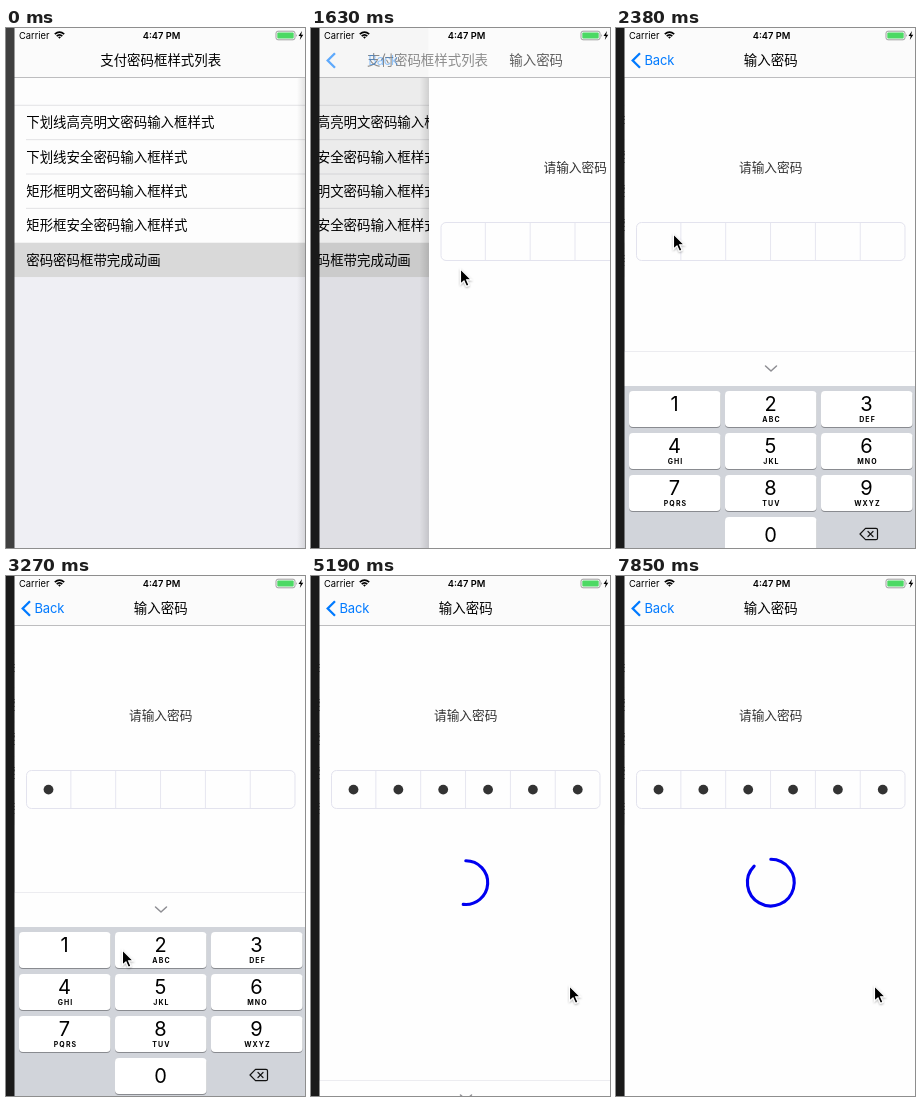
An HTML page for the animation above (8 s loop, 299 by 520 pixels).

```html
<!DOCTYPE html>
<html lang="zh-CN">
<head>
<meta charset="utf-8">
<title>Passcode entry</title>
<style>
  html, body { margin: 0; width: 100%; height: 100%; overflow: hidden; background: #fff; }
  svg { display: block; width: 100%; height: 100%; }
  text { font-family: Inter, Roboto, "Noto Sans CJK SC", "Noto Sans CJK", sans-serif; }
  .cjk { font-family: "Noto Sans CJK SC", "Noto Sans CJK", sans-serif; font-size: 13.45px; }
  .title { font-weight: 500; text-anchor: middle; }
  .status { font-size: 9.3px; }
  .digit { font-size: 20px; text-anchor: middle; }
  .letters { font-size: 7px; font-weight: 700; letter-spacing: 1.1px; text-anchor: middle; }
  .line { fill: none; stroke-linecap: round; stroke-linejoin: round; }
</style>
</head>
<body>
<svg viewBox="0 0 299 520">
  <defs>
    <linearGradient id="edge">
      <stop offset="0" stop-color="#000" stop-opacity="0"/>
      <stop offset="1" stop-color="#000" stop-opacity=".12"/>
    </linearGradient>
    <filter id="soft" x="-50%" y="-50%" width="200%" height="200%">
      <feDropShadow dx="0" dy="1" stdDeviation="1" flood-opacity=".35"/>
    </filter>
  </defs>

  <g id="list">
    <rect x="8" y="49" width="292" height="471" fill="#efeff4"/>
    <rect x="8" y="49" width="292" height="200" fill="#fdfdfd"/>
    <g id="rows"></g>
  </g>
  <rect id="dim" y="49" width="299" height="471"/>

  <g id="page">
    <rect x="-1" y="50" width="9.5" height="470" fill="url(#edge)"/>
    <rect x="8.5" y="49" width="292" height="471" fill="#fefefe"/>
    <text class="cjk" x="154.7" y="144.2" text-anchor="middle" style="font-size:12.7px" fill="#333">请输入密码</text>
    <rect x="20.5" y="194.5" width="268.5" height="38" rx="5" fill="none" stroke="#e3e3ee"/>
    <g id="cells"></g>
    <path id="ring" class="line" stroke="#0000f0" stroke-width="3.1"/>
  </g>

  <g id="keyboard">
    <rect x="8" y="316" width="292" height="36" fill="#fefefe"/>
    <path d="M8 316.5H299" stroke="#ececf0"/>
    <path d="M149.5 331 155 336 160.500 331" class="line" stroke="#8e8e93" stroke-width="1.5"/>
    <rect x="8" y="351" width="292" height="380" fill="#d1d4da"/>
    <g id="keys"></g>
    <g class="line" stroke="#111" stroke-width="1.2">
      <path d="M244 499 249.500 493.300H260Q261.500 493.300 261.500 494.800V503.200Q261.500 504.700 260 504.700H249.500Z"/>
      <path d="M252 496.500 257 501.500M257 496.500 252 501.500"/>
    </g>
  </g>

  <rect x="8" width="292" height="49.500" fill="#fbfbfb"/>
  <rect id="barShade" x="8" width="0" height="49" fill="#000" opacity=".018"/>
  <path d="M8 49.500H299" stroke="#bdbdbf"/>
  <text id="oldTitle" class="cjk title" x="154.7" y="37.200">支付密码框样式列表</text>
  <text id="newTitle" class="cjk title" x="154.7" y="37.200">输入密码</text>
  <path id="chevron" d="M24 25.300 16.700 32.500 24 39.700" class="line" stroke="#007aff" stroke-width="2.300" style="stroke-linecap:butt;stroke-linejoin:miter"/>
  <text id="back" x="28.500" y="37" fill="#007aff" font-size="13" letter-spacing="-.2">Back</text>

  <text class="status" x="13" y="10.800">Carrier</text>
  <g class="line" stroke="#000" stroke-width="1.700" style="stroke-linecap:butt">
    <path d="M48.800 6.200Q53.500 1.900 58.200 6.200"/>
    <path d="M50.700 8.200Q53.500 5.600 56.300 8.200"/>
    <path d="M52 9 53.500 10.800 55 9Q53.500 7.900 52 9Z" fill="#000" stroke="none"/>
  </g>
  <text class="status" x="155.500" y="10.800" font-weight="600" text-anchor="middle">4:47 PM</text>
  <rect x="270" y="3.200" width="19" height="8.600" rx="2" fill="none" stroke="#8a8a8a" stroke-width=".8"/>
  <rect x="271.300" y="4.500" width="16.400" height="6" rx="1" fill="#4cd964"/>
  <path d="M290.300 6V9Q291.800 7.500 290.300 6Z" fill="#8a8a8a"/>
  <path d="M296 3 292.500 8H294.700L293.800 12 297.300 6.800H295.200Z"/>

  <rect id="strip" width="8.500" height="520"/>
  <path id="cursor" d="M0 0V15L3.500 11.800 5.900 17.300 8.500 16.200 6.100 10.800H10.800Z" stroke="#fff" stroke-width="1.100" filter="url(#soft)"/>
</svg>

<script>
const LOOP = 8000;
const PAGE_WIDTH = 292;
const KEYBOARD_HEIGHT = 204;
const PUSH = 1514, KEYBOARD_IN = 2095, KEYBOARD_OUT = 4960;
const LOADING = 4932, SUCCESS = 7413;

// The picture holds between steps: [first, last, count]
const steps = [[0, 0, 1], [300, 1330, 8], [1480, 2380, 7], [2530, 3570, 8],
  [3720, 4750, 8], [4900, 5920, 8], [6070, 7110, 8], [7260, 7850, 5]]
  .flatMap(([a, b, n]) => Array.from({ length: n }, (_, i) => a + (b - a) * i / Math.max(1, n - 1)));

const pointer = [
  [300, 222, 437], [600, 205, 380], [1030, 160, 270], [1330, 149.500, 241],
  [1780, 149.500, 241], [2380, 57.500, 206], [2530, 57, 225], [2976, 60, 372],
  [3124, 62, 374], [3273, 116.500, 374], [3421, 150, 373], [3570, 152, 373],
  [3867, 248, 374], [4014, 240, 380], [4456, 72.500, 409], [4603, 95, 409],
  [4750, 152, 409], [4900, 258.500, 410]];

const presses = [[3100, 1], [3560, 2], [3860, 3], [4320, 4], [4740, 5], [4890, 6]];

const $ = id => document.getElementById(id);

function add(parent, tag, attrs, content = '') {
  const node = document.createElementNS('http://www.w3.org/2000/svg', tag);
  set(node, attrs);
  node.textContent = content;
  return parent.appendChild(node);
}

function set(node, attrs) {
  for (const name in attrs) node.setAttribute(name, attrs[name]);
}

const shift = (node, x, y = 0) => set(node, { transform: `translate(${x} ${y})` });

['下划线高亮明文密码输入框样式', '下划线安全密码输入框样式', '矩形框明文密码输入框样式',
  '矩形框安全密码输入框样式', '密码密码框带完成动画'].forEach((label, i) => {
  const y = 77.300 + i * 34.350;
  if (i === 4) add($('rows'), 'rect', { x: 8, y, width: 292, height: 34.350, fill: '#d9d9d9' });
  else add($('rows'), 'path', { d: `M${i ? 20 : 8} ${y}H300`, stroke: '#dcdce0', 'stroke-width': .8 });
  add($('rows'), 'text', { class: 'cjk', x: 20.200, y: y + 22 }, label);
});

const dots = Array.from({ length: 6 }, (_, i) => {
  const x = 20 + i * 44.850;
  if (i) add($('cells'), 'path', { d: `M${x} 195V232`, stroke: '#e6e6f0' });
  return add($('cells'), 'circle', { cx: x + 22.500, cy: 213.600, r: 4.900, fill: '#333' });
});

const keys = {};
['', 'ABC', 'DEF', 'GHI', 'JKL', 'MNO', 'PQRS', 'TUV', 'WXYZ', ''].forEach((letters, i) => {
  const digit = (i + 1) % 10;
  const x = 13 + (digit ? i % 3 : 1) * 96, y = 356 + Math.floor(i / 3) * 42;
  const box = { x, y, width: 91.500, height: 36, rx: 4 };
  add($('keys'), 'rect', { ...box, y: y + 1, fill: '#898b90' });
  keys[digit] = add($('keys'), 'rect', { ...box, fill: '#fff' });
  add($('keys'), 'text', { class: 'digit', x: x + 45.500, y: y + (digit ? 19.500 : 24.500) }, digit);
  add($('keys'), 'text', { class: 'letters', x: x + 46.500, y: y + 30.600 }, letters);
});

// Critically damped spring, 0 to 1
function spring(ms) {
  const x = Math.max(0, ms) * .01826;
  return 1 - (1 + x) * Math.exp(-x);
}

function along(path, t) {
  const i = path.findIndex(p => p[0] > t);
  if (i < 0) return path.at(-1).slice(1);
  const [t0, x0, y0] = path[Math.max(0, i - 1)], [t1, x1, y1] = path[i];
  const k = t1 > t0 ? (t - t0) / (t1 - t0) : 0;
  return [x0 + (x1 - x0) * k, y0 + (y1 - y0) * k];
}

// Start and end are fractions of a turn, clockwise from the top
function arc(start, end, r) {
  if (end - start < .002) return '';
  end = Math.min(end, start + .9999);
  const point = f => `${154.8 + r * Math.sin(f * 2 * Math.PI)} ${306.6 - r * Math.cos(f * 2 * Math.PI)}`;
  return `M${point(start)}A${r} ${r} 0 ${end - start > .5 ? 1 : 0} 1 ${point(end)}`;
}

function ringPath(t) {
  if (t < LOADING) return '';
  if (t >= SUCCESS) return arc(0, (t - SUCCESS) / 500, 23.400);
  // Quick growth to three quarters, then the tail catches up
  const phase = (t - LOADING) % 1208;
  const end = phase < 375 ? phase / 500 : .75 + (phase - 375) * .0003;
  return arc(Math.max(0, 1 - (1 - end) / .25), end, 21.900);
}

function draw(t) {
  const push = spring(t - PUSH), rest = 1 - push;
  shift($('list'), -.3 * PAGE_WIDTH * push);
  shift($('page'), PAGE_WIDTH * rest);
  set($('dim'), { opacity: .065 * push / .623 });
  set($('barShade'), { width: push ? PAGE_WIDTH * rest : 0 });

  shift($('oldTitle'), -61 * push);
  shift($('newTitle'), 188 * rest);
  shift($('back'), 77 * rest);
  set($('oldTitle'), { opacity: push > .98 ? 0 : 1 - .9 * push });
  set($('newTitle'), { opacity: push });
  set($('chevron'), { opacity: push });
  set($('back'), { opacity: push * push });

  const shown = spring(t - KEYBOARD_IN) - spring(t - KEYBOARD_OUT);
  shift($('keyboard'), 0, Math.round(KEYBOARD_HEIGHT * (1 - shown)));

  presses.forEach(([at, digit], i) => {
    set(dots[i], { opacity: t >= at ? 1 : 0 });
    set(keys[digit], { fill: t >= at && t < at + 90 ? '#bcc1ca' : '#fff' });
  });

  set($('ring'), { d: ringPath(t) });
  set($('strip'), { fill: t < 1480 ? '#404040' : '#1a1a1a' });
  shift($('cursor'), ...along(pointer, t));
  set($('cursor'), { opacity: t < 300 ? 0 : 1 });
}

const begin = performance.now();
function frame() {
  const t = (performance.now() - begin) % LOOP;
  draw(steps.findLast(s => s <= t + 7));
  requestAnimationFrame(frame);
}
frame();
</script>
</body>
</html>
```
